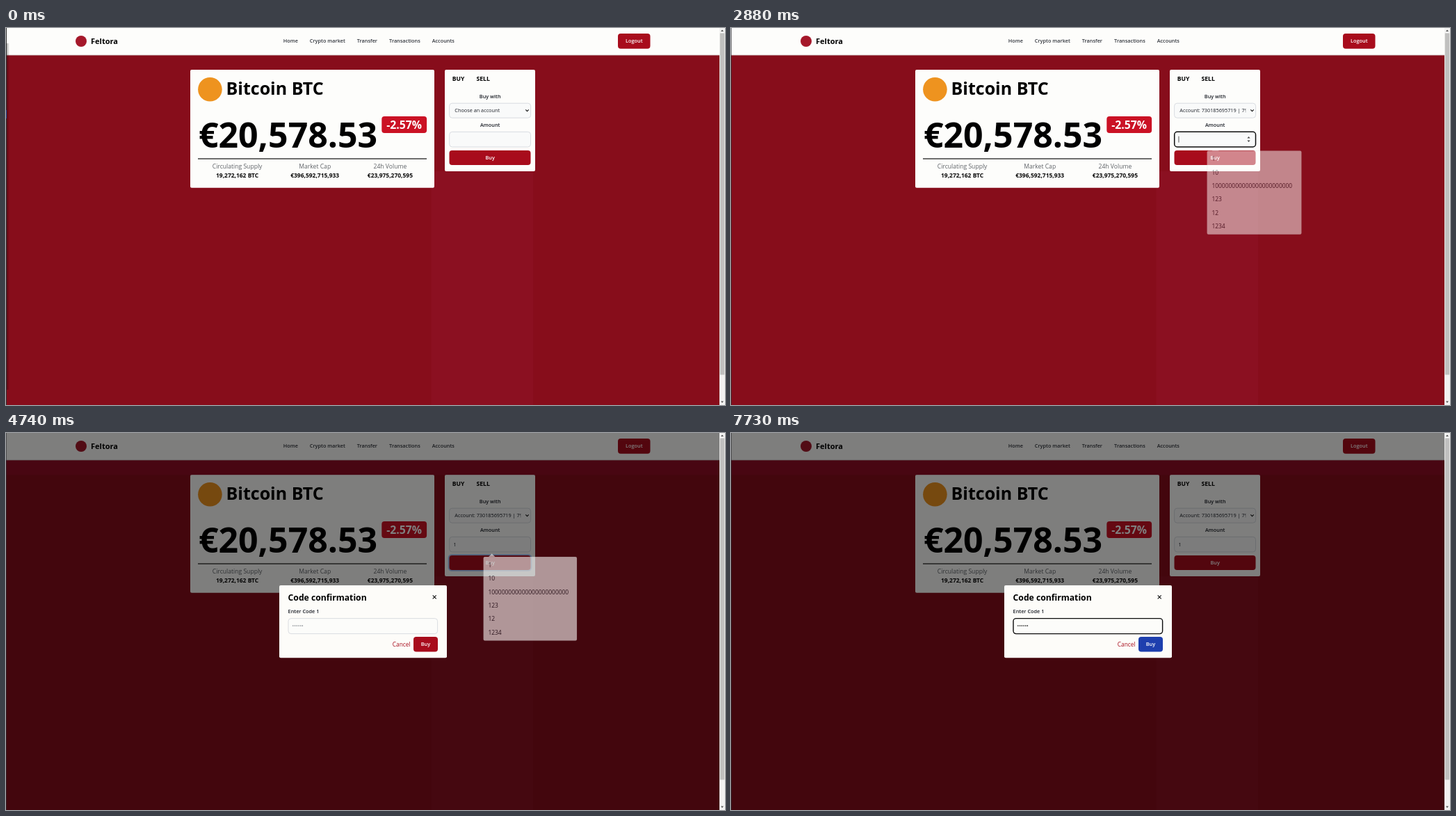
Animation, 1034 px wide and 542 px high, one loop 8 s. Source, as an HTML page:

```html
<!DOCTYPE html>
<html lang="en">
<head>
<meta charset="utf-8">
<title>Crypto purchase</title>
<style>
  html, body { margin: 0; width: 100%; height: 100%; overflow: hidden; background: #870d1b; }
  svg { display: block; width: 100vw; height: 100vh; }
  text { font-family: "Open Sans", "Noto Sans", sans-serif; white-space: pre; }
</style>
</head>
<body>
<svg id="stage" viewBox="0 0 1034 542" preserveAspectRatio="none"></svg>
<script>
const LOOP = 8000;
const RED = '#a80c1c', BLUE = '#1e3fae', PAPER = '#fdfdfb', FIELD = '#f9fafa', LINE = '#d1d5db', INK = '#1b1f27';

const rect = (x, y, w, h, fill, rx = 0, extra = '') =>
  `<rect x="${x}" y="${y}" width="${w}" height="${h}" fill="${fill}" rx="${rx}" ${extra}/>`;
const label = (s, x, y, size, weight = 400, fill = '#000', anchor = 'start', extra = '') =>
  `<text x="${x}" y="${y}" font-size="${size}" font-weight="${weight}" fill="${fill}" text-anchor="${anchor}" ${extra}>${s}</text>`;
const mid = (s, x, y, size, weight, fill) => label(s, x, y, size, weight, fill, 'middle');
const path = (d, stroke, width, extra = '') =>
  `<path d="${d}" fill="none" stroke="${stroke}" stroke-width="${width}" ${extra}/>`;
const group = (id, body, extra = '') => `<g id="${id}" ${extra}>${body}</g>`;

const accounts = [
  'Account: 179326068415 | 98,766,253,710.43 AED',
  'Account: 730185695719 | 79,372.96 EUR',
  'Account: 161415339175 | 10.40 GBP'
];
const history = ['1', '10', '1' + '0'.repeat(23), '123', '12', '1234'];
const nav = [['Home', 409.4], ['Crypto market', 462.3], ['Transfer', 519.4], ['Transactions', 573.4], ['Accounts', 628.8]];
const stats = [
  ['Circulating Supply', '19,272,162 BTC', 332.6],
  ['Market Cap', '€396,592,715,933', 444.2],
  ['24h Volume', '€23,975,270,595', 552.4]
];

const defs = `<defs>
  <clipPath id="selectClip"><rect x="640" y="109" width="100.5" height="20"/></clipPath>
  <linearGradient id="edgeFade"><stop offset="0" stop-opacity=".4"/><stop offset="1" stop-opacity="0"/></linearGradient>
</defs>`;

const header =
  rect(0, 0, 1026, 39, PAPER) + rect(0, 38.6, 1026, .8, '#c9b9b8') +
  `<circle cx="108" cy="19" r="8" fill="#a5182a"/>` +
  label('Feltora', 122, 22.6, 11, 700) +
  nav.map(([s, x]) => mid(s, x, 21.4, 7.3, 600, '#32363d')).join('') +
  rect(880, 8, 46.5, 21.7, RED, 4) + mid('Logout', 903.3, 21.4, 7.3, 600, '#fff');

const coinCard =
  rect(265, 60, 351, 169.7, PAPER, 2) +
  `<circle cx="293.4" cy="88.3" r="17.3" fill="#ee931f"/>` +
  label('Bitcoin BTC', 316.5, 95.5, 25, 700) +
  label('€20,578.53', 277, 172.4, 50, 700) +
  rect(540.3, 127, 64.8, 24, '#cb1225', 4) + mid('-2.57%', 572.6, 144.9, 15.8, 700, '#fff') +
  rect(276, 187.4, 329, 1.2, '#111') +
  stats.map(([name, value, x]) =>
    mid(name, x, 202.4, 8.6, 400, '#5f6368') + mid(value, x, 215.3, 8.45, 700, '#0a0a0a')).join('');

const tradeCard =
  rect(631, 60, 130, 146, PAPER, 2) +
  label('BUY', 641.8, 76.4, 8.5, 700) + label('SELL', 676.4, 76.4, 8.7, 700) +
  mid('Buy with', 696.2, 100.7, 7.3, 600, INK) + mid('Amount', 696.2, 141.7, 7.3, 600, INK) +
  rect(637.6, 108.2, 117, 21, FIELD, 4, 'id="select"') +
  label('', 645.3, 121.1, 7.3, 400, INK, 'start', 'id="chosen" clip-path="url(#selectClip)"') +
  path('M747.3 117.4l2.2 2.3l2.2-2.3', '#111', 1.1) +
  rect(637.7, 149.3, 116.8, 21.7, FIELD, 4, 'id="amount"') +
  label('', 643.4, 162.8, 7.3, 400, INK, 'start', 'id="amountText"') +
  rect(643.6, 155.6, .7, 9, '#111', 0, 'id="amountCaret"') +
  `<path id="spin" d="M742.4 158.6l2.1-2.6l2.1 2.6zM742.4 161.4l2.1 2.6l2.1-2.6z" fill="#444"/>` +
  rect(636.6, 175.2, 118.8, 22.6, 'none', 4.5, 'id="ring" stroke="#a4cafe" stroke-width="2"') +
  rect(637.5, 176, 117, 21, RED, 4, 'id="buy"') + mid('Buy', 696.2, 189, 7.3, 600, '#fff');

const dropdown = group('dropdown',
  rect(638.5, 131, 177, 40, '#000', 0, 'opacity=".2"') +
  rect(637.8, 129.6, 176.4, 39.2, PAPER, 0, 'stroke="#aaa" stroke-width=".6"') +
  rect(638, 0, 176, 9.6, '#1e90ea', 0, 'id="mark"') +
  label('Choose an account', 645.3, 136.8, 7.3, 400, '#85878a') +
  accounts.map((s, i) => label(s, 645.3, 146.3 + i * 9.4, 7.3, 400, '#111', 'start', `id="row${i}"`)).join(''));

const dim = group('dim',
  rect(0, 0, 1026, 542, '#000', 0, 'opacity=".5"') +
  rect(0, 39.4, 1026, 21, '#50061a', 0, 'opacity=".4"'));

const popup = group('popup',
  `<path d="M691.5 177l5.2-5l5.2 5z" fill="${PAPER}"/>` +
  rect(684.6, 176.5, 135.8, 120.3, PAPER, 2, 'id="popupBox" stroke="#999" stroke-opacity=".35" stroke-width=".5"') +
  history.map((s, i) => label(s, 691.4, 191.1 + i * 19.42, 8.45, 400, INK)).join(''));

const modal = group('modal',
  rect(393, 219, 241, 104.3, '#fdfcf9', 2) +
  label('Code confirmation', 405.6, 240.5, 12.2, 700) +
  path('M613.7 233.4l5 5m0-5l-5 5', '#111', 1.1) +
  label('Enter Code 1', 405.6, 259.1, 7.3, 600, INK) +
  rect(406, 266.6, 214.6, 22, '#fcfcfa', 4, 'id="code"') +
  label('••••••', 411.6, 280.2, 7.2, 400, '#000', 'start', 'id="dots"') +
  rect(0, 273, .7, 9, '#111', 0, 'id="codeCaret"') +
  label('Cancel', 555.8, 307, 8.3, 400, RED) +
  rect(586, 293, 35, 21.6, RED, 4, 'id="confirm"') + mid('Buy', 603.4, 306.3, 7.3, 600, '#fff'));

const edge = rect(0, 0, .8, 542, '#2a2a30', 0, 'opacity=".75"') +
  group('overlap', rect(0, 22, 5, 498, 'url(#edgeFade)') + rect(0, 0, 1, 542, '#333') + rect(0, 118, 1, 12, '#24519c'));

const scrollbar = rect(1026, 0, 8, 542, '#f2f2f1') + rect(1026.8, 7.5, 6.4, 491, '#c0c0bf') +
  `<path d="M1028 5l2-2.4l2 2.4zM1028 536.6l2 2.4l2-2.4z" fill="#555"/>`;

const stage = document.getElementById('stage');
stage.innerHTML = defs + rect(0, 0, 1034, 542, '#870d1b') + rect(611.5, 206, 146.5, 336, '#8b1021') +
  header + coinCard + tradeCard + dim + modal + dropdown + popup + edge + scrollbar;

const el = {};
stage.querySelectorAll('[id]').forEach(n => el[n.id] = n);
const set = (id, attrs) => { for (const k in attrs) el[id].setAttribute(k, attrs[k]); };
const show = (id, on) => set(id, { visibility: on ? 'visible' : 'hidden' });
const write = (id, s) => { if (el[id].textContent !== s) el[id].textContent = s; };
const outline = (id, on, color = '#0c0c0c', width = 1.5) =>
  set(id, { stroke: on ? color : LINE, 'stroke-width': on ? width : .8 });

const closing = [.96, .85, .58, .34, .14];

function popupAlpha(t) {
  if (t < 2880) return 0;
  if (t < 2980) return .5;
  if (t < 4640) return 1;
  return closing[Math.floor((t - 4640) / 50)] || 0;
}

function update(t) {
  const within = (a, b) => t >= a && t < b;

  show('overlap', t < 1400);

  outline('select', within(1400, 2880), '#3f83f8', 1);
  write('chosen', t < 2570 ? 'Choose an account' : accounts[1]);
  set('dropdown', { opacity: within(1400, 2570) ? (t < 1450 ? .4 : t < 1500 ? .8 : 1) : 0 });
  const active = t < 1910 ? -1 : t < 2160 ? 0 : 1;
  show('mark', active >= 0);
  set('mark', { y: 139.6 + active * 9.4 });
  accounts.forEach((_, i) => set('row' + i, { fill: i === active ? '#fff' : '#111' }));

  const typing = within(2880, 4640);
  outline('amount', typing);
  write('amountText', t < 3600 ? '' : '1');
  show('amountCaret', within(2880, 4220));
  set('amountCaret', { x: t < 3600 ? 643.6 : 647.6 });
  show('spin', typing);

  show('ring', within(4640, 5780));
  set('buy', { fill: within(4220, 4740) ? BLUE : RED });

  const alpha = popupAlpha(t);
  const shift = t < 4640 ? 0 : Math.floor((t - 4640) / 50);
  set('popup', { opacity: alpha, transform: `translate(${shift} ${shift * .8})` });
  set('popupBox', { width: 135.8 - shift * .7 });

  show('dim', t >= 4740);
  show('modal', t >= 4740);
  outline('code', t >= 5780, '#0c0c0c', 1.4);
  set('dots', { fill: t < 7120 ? '#85898f' : '#111' });
  const caretOn = within(5780, 6400) || within(6970, 7630);
  set('codeCaret', { x: t < 7120 ? 412 : 428.5, opacity: caretOn ? 1 : 0 });
  set('confirm', { fill: t < 7730 ? RED : BLUE });
}

const start = performance.now();
function tick() {
  update((performance.now() - start) % LOOP);
  requestAnimationFrame(tick);
}
tick();
</script>
</body>
</html>
```
